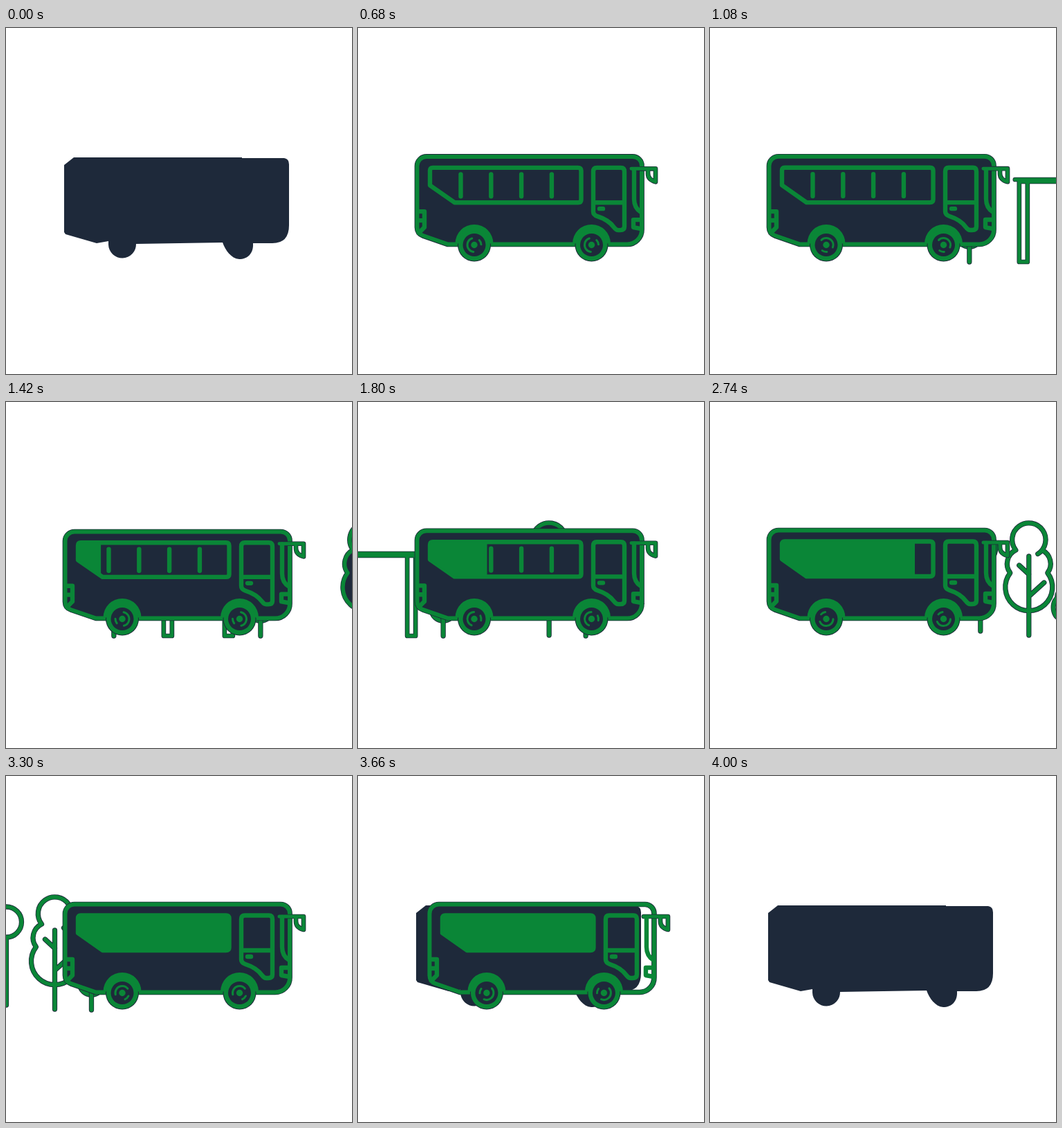
An HTML page with a canvas that plays this animation: 500x500 px, repeating every 4.26 s.

```html
<!DOCTYPE html>
<html lang="en">
<head>
<meta charset="utf-8">
<title>Bus ride</title>
<style>
html, body { margin: 0; width: 100%; height: 100%; overflow: hidden; background: #fff; }
canvas { display: block; width: 500px; height: 500px; }
</style>
</head>
<body>
<canvas id="stage" width="500" height="500"></canvas>
<script>
const ctx = document.getElementById('stage').getContext('2d');
const GREEN = '#0a8637', DARK = '#1e293a';
const LOOP = 4260;
const WHEELS = [168, 337.5];

const silhouette = new Path2D(`M98 187H341V188H402Q409 189 409 197V285Q409 311 385 311H357
  C358 326 349 334 337 334C325 333 317 321 313 310L188 312A20 20 0 0 1 148 313V308L131 311L86 298
  L84 295V198Z`);
const shell = new Path2D(`M99 185.5H397A13 13 0 0 1 410 198.5V291A21 21 0 0 1 389 312.5H130L94 300
  Q85.5 297 85.5 288V199A13.5 13.5 0 0 1 99 185.5Z`);
const windows = new Path2D(`M108 201.5H318Q322.5 201.5 322.5 206V248Q322.5 252 318 252H139.5
  L104 227V206Q104 201.5 108 201.5Z`);
const details = new Path2D(`M345 201.5H380Q385 201.5 385 207V287Q385 292 379 292H376
  Q373 292 370 288Q362 277 346 272Q340 270 340 265V207Q340 201.5 345 201.5ZM340 252H385
  M349 261H354M87 265H96V288L88 296M87 278H96
  M399 204V247Q399 260 409 266M409 277H398V288L409 290`);
const mirror = new Path2D('M395 203H430V222Q419 219 419 210V203');

const crown = 'M-19 214A22 22 0 0 0 -27 247A34 34 0 1 0 27 247A22 22 0 0 0 19 214';
const treeFill = new Path2D(crown + 'A24 24 0 1 0 -19 214Z');
const treeLine = new Path2D(crown + `M-19 214A24.2 24.2 0 1 1 13 219.5
  M0 223V337M0 249L-14 236M1 280L22 261`);
const bushFill = new Path2D(`M-12 283C-14 266 14 266 12 283C22 291 19 316 0 316
  C-19 316 -22 291 -12 283Z`);
const trunk = new Path2D('M0 291V338');
const lamp = new Path2D('M22 211A22 22 0 1 1 -22 211A22 22 0 1 1 22 211M0 234V331');
const shelter = new Path2D(`M-50 338V222H50V338H38V222M-50 338H-38V222M-56 219H56`);

// Linear interpolation through [time, value] points.
function track(points, t) {
  if (t <= points[0][0]) return points[0][1];
  for (let i = 1; i < points.length; i++) {
    const [t0, v0] = points[i - 1], [t1, v1] = points[i];
    if (t <= t1) return v0 + (v1 - v0) * (t - t0) / (t1 - t0);
  }
  return points[points.length - 1][1];
}

function line(path, width = 6.4, edged = false) {
  if (edged) {
    ctx.strokeStyle = DARK;
    ctx.lineWidth = width + 1.7;
    ctx.stroke(path);
  }
  ctx.strokeStyle = GREEN;
  ctx.lineWidth = width;
  ctx.stroke(path);
}

function fill(path, color) {
  ctx.fillStyle = color;
  ctx.fill(path);
}

function disc(x, y, r, color) {
  ctx.fillStyle = color;
  ctx.beginPath();
  ctx.arc(x, y, r, 0, Math.PI * 2);
  ctx.fill();
}

function at(x, draw) {
  if (x < -70 || x > 570) return;
  ctx.save();
  ctx.translate(x, 0);
  draw();
  ctx.restore();
}

function tree(x, solid) {
  at(x, () => {
    if (solid) fill(treeFill, DARK);
    line(treeLine, 5.6, true);
  });
}

function bush(x, solid) {
  at(x, () => {
    if (solid) fill(bushFill, DARK);
    line(bushFill, 5.6, true);
    line(trunk, 5.6, true);
  });
}

function scenery(t) {
  const first = 521.5 - 0.644 * (t - 1420);
  const second = 461.5 - 0.697 * (t - 2740);
  bush(first - 365, true);
  at(first - 243, () => line(shelter, 5, true));
  bush(first - 153, true);
  tree(first, true);
  bush(first + 53, true);
  at(second - 70, () => line(lamp, 5.6, true));
  tree(second, false);
  bush(second + 53, false);
}

function wheel(x, angle) {
  const y = 313.5;
  disc(x, y, 24, DARK);
  ctx.fillStyle = GREEN;
  ctx.beginPath();
  ctx.arc(x, y - 2, 27.5, Math.PI, 0);
  ctx.fill();
  disc(x, y, 23, GREEN);
  disc(x, y, 16.5, DARK);
  disc(x, y, 4.7, GREEN);
  ctx.strokeStyle = GREEN;
  ctx.lineWidth = 3;
  for (const [from, to] of [[-0.35, 0.35], [2.1, 4.8]]) {
    ctx.beginPath();
    ctx.arc(x, y, 10, angle + from, angle + to);
    ctx.stroke();
  }
}

function body(t) {
  const bounce = t > 600 && t < 3300 ? 1 - Math.cos((t - 2220) / 540 * Math.PI * 2) : 0;
  ctx.save();
  ctx.translate(0, 312.5);
  ctx.scale(1, 1 - bounce / 127);
  ctx.translate(0, -312.5);
  line(shell, 6, true);
  line(mirror, 5, true);
  line(details);
  line(windows);
  for (let i = 0; i < 4; i++) {
    const x = 148.5 + i * 43.8;
    line(new Path2D(`M${x} 211V243`));
  }
  const edge = track([[1140, 101], [1420, 137], [2220, 241], [2740, 296], [3020, 325]], t);
  ctx.beginPath();
  ctx.rect(101, 198, edge - 101, 58);
  ctx.clip();
  fill(windows, GREEN);
  ctx.restore();
}

function busOffset(t) {
  if (t < 660) return -440 * (1 - (t - 240) / 420) ** 3;
  if (t > 3480) return 425 * ((t - 3480) / 520) ** 3;
  return 0;
}

function draw(t) {
  ctx.fillStyle = '#fff';
  ctx.fillRect(0, 0, 500, 500);
  ctx.lineCap = ctx.lineJoin = 'round';
  const moving = t >= 240 && t < 4000;
  if (moving) scenery(t);
  fill(silhouette, DARK);
  if (!moving) return;
  const degrees = track([[240, -300], [680, -25], [1420, 880], [2220, 2040],
    [2740, 2760], [3300, 3645], [4000, 4640]], t);
  ctx.save();
  ctx.translate(busOffset(t), 0);
  body(t);
  for (const x of WHEELS) wheel(x, degrees * Math.PI / 180);
  ctx.restore();
}

const start = performance.now();
function tick() {
  draw((performance.now() - start) % LOOP);
  requestAnimationFrame(tick);
}
tick();
</script>
</body>
</html>
```
